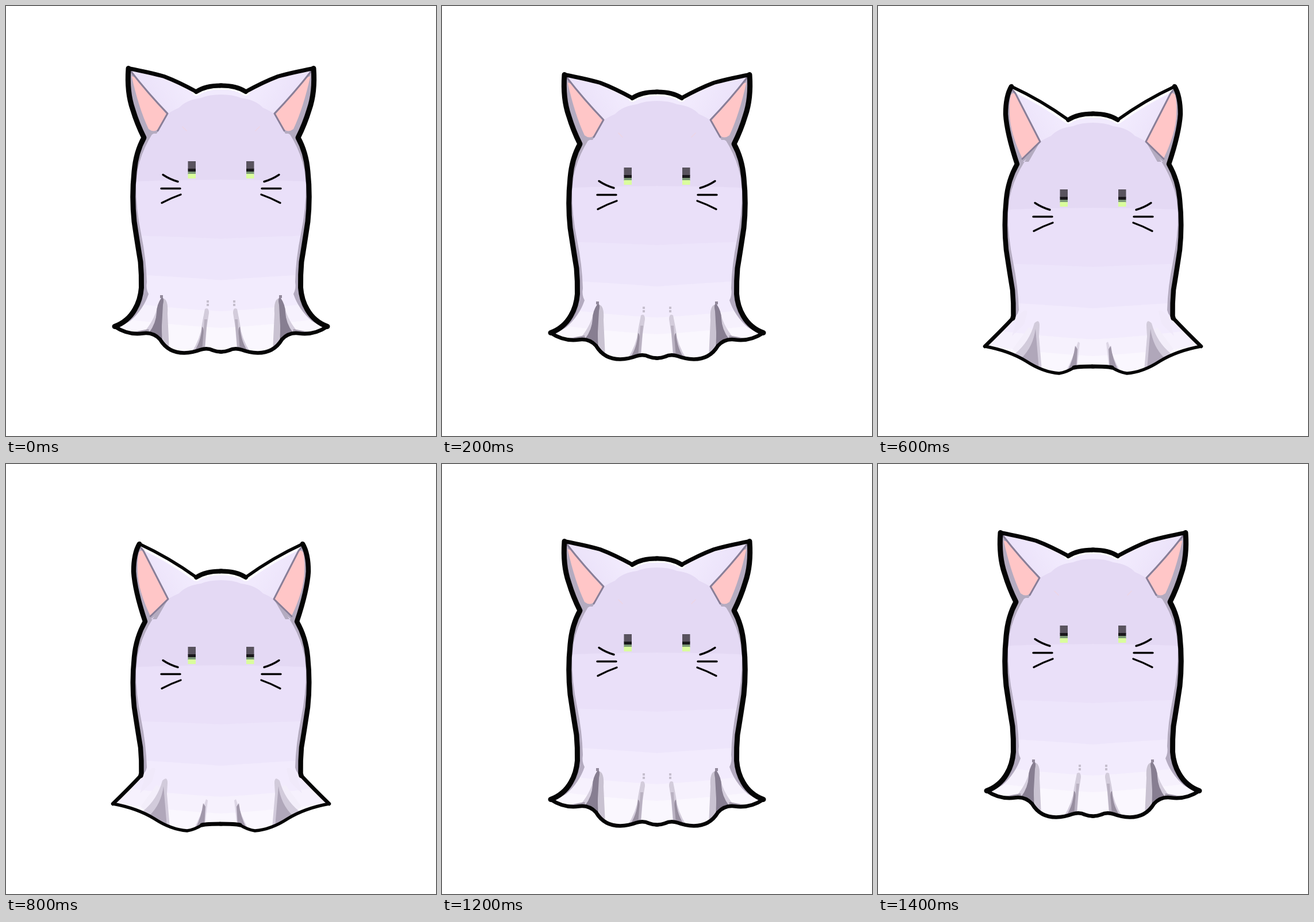
An HTML page with a canvas for the animation above (1.6 s loop, 748 by 748 pixels).

```html
<!DOCTYPE html>
<html lang="en">
<head>
<meta charset="utf-8">
<title>Ghost cat</title>
<style>
  html, body { margin: 0; width: 100%; height: 100%; overflow: hidden; background: #fff; }
  canvas { display: block; width: 100%; height: 100%; }
</style>
</head>
<body>
<canvas id="stage" width="748" height="748"></canvas>
<script>
const SIZE = 748, STEP = 200;
const ctx = document.getElementById('stage').getContext('2d');

// Vertical offset for every step of the bob; the low steps use the perky pose.
const DROP = [0, 11, 20, 49, 48, 42, 26, 11];
const isPerky = step => step >= 3 && step <= 5;

const HEAD = 'M375 138.500 Q348 138 331 149';
const FLANK = 'Q226 254 223 288 Q218.500 332 223 375 Q229 415 234 445 Q236 468 235.500 490';
const SHADE = 'M225 222 L262 222 L282 187 Q240 232 229 285 L226 312 Q226 352 235 396 Q244 440 245 480';

// Every drawing covers the left half and is mirrored for the right one.
const calm = {
  outline: [
    [8, HEAD],
    [7, 'M331 149 Q300 132 275 122.500 Q252 116 213 108.500'],
    [9, 'M213 108.500 Q210 150 220.500 180 Q228 205 240 229 ' + FLANK + ' Q234 511 224 528 Q212 549 189 557.500'],
    [6.5, 'M189 557.500 Q212 573 238 569.500 Q256 567 268 580 Q282 603.500 310 603.500 Q325 603 338 598 Q350 594 360 599 Q368 602 375 601.500']
  ],
  rim: HEAD,
  ear: 'M214 110 L281 187 L262 219 L243 230 L205 190 L207 110 Z',
  pink: 'M218.500 122 L224 124 L279 188 L265 214 Q257 221 248 214 Q231 178 218.500 122 Z',
  crease: 'M216 112 Q247 152 281 187 L264 217',
  shade: SHADE + ' Q243 492 248 501 Q239 528 216 548 L196 560 L190 550 L215 500 Z',
  marks: [
    ['#aaa2b4', 'M235 490 Q241 500 236 517 Q228 541 200 557 L196 550 L225 520 Z'],
    ['#d5cedd', 'M263 524 Q258 548 236 572 L262 574 L272 530 Z'],
    ['#c9c2d1', 'M270 508 Q283 507 281 535 L284 601 L273 588 L270 540 Z'],
    ['#877e91', 'M270 508 Q276 505 273 520 L271 556 L272 584 L249 568 Q261 552 262 533 Q262 520 270 508 Z'],
    ['#a49cac', 'M204 564 L216 568 L248 562 L251 575 L210 573 Z'],
    ['#d3ccdb', 'M346 527 Q353 523 353 534 L349 560 L346 601 L322 604 Q339 578 341 553 Z'],
    ['#b9b1c1', 'M345 545 L350 545 L345 599 L337 602 Q344 575 345 545 Z'],
    ['#978e9f', 'M341 558 Q345 559 343 574 L341 600 L325 604 Q339 586 341 558 Z'],
    ['#c6bfce', 'M349 512 h4 v4 h-4 Z M349 518 h4 v4 h-4 Z'],
    ['#948b9d', 'M268 503 h5 v5 h-5 Z']
  ]
};

const perky = {
  outline: [
    [8, HEAD],
    [5.5, 'M331 149 Q284 115 232 91'],
    [8.5, 'M232 91 Q222 108 222 139 Q224 172 242 226 ' + FLANK + ' L234.500 494'],
    [6.5, 'M234.500 494 Q213 517 186 543'],
    [5.5, 'M186 543 Q229 551 258 569 Q287 588 315 590 Q327 588.500 341 580'],
    [7, 'M341 580 Q349 578 375 578']
  ],
  rim: HEAD + ' Q284 115 236 93',
  ear: 'M231 88 L238 102 L283 187 L264 212 L244 229 L215 180 L218 110 Z',
  pink: 'M231 106 Q236 98 241 108 L281 186 L251 216 Q230 172 229 140 Q228 120 231 106 Z',
  crease: 'M235 98 L239 103 Q261 146 282 187 L251 217',
  shade: SHADE + ' L243 486 L237 494 L225 490 Z',
  marks: [
    ['#f0e9fa', 'M244 489 Q258 476 260 483 L254 505 L233 525 Z'],
    ['#f3eefa', 'M262 510 L234 548 L250 560 L276 520 Z'],
    ['#d2cbdb', 'M272 503 Q281 494 281 507 L280 526 L285 585 L238 556 Q263 536 272 503 Z'],
    ['#b0a7ba', 'M274 512 L280 583 L249 564 Q270 544 274 512 Z'],
    ['#ddd6e5', 'M348 535 L351 537 L346 581 L326 588 Q338 566 348 535 Z'],
    ['#a198aa', 'M343 542 L347 548 L345 581 L329 587 Q340 566 343 542 Z']
  ]
};

function prepare(pose) {
  const joined = pose.outline.map(([, d]) => d).join(' ');
  pose.body = new Path2D(joined.replace(/M/g, 'L').replace('L', 'M') + ' Z');
  for (const key of ['rim', 'ear', 'pink', 'crease', 'shade']) pose[key] = new Path2D(pose[key]);
  for (const key of ['outline', 'marks']) pose[key] = pose[key].map(([look, d]) => [look, new Path2D(d)]);
}
[calm, perky].forEach(prepare);

const fill = (color, path) => { ctx.fillStyle = color; ctx.fill(path); };
const line = (color, width, path) => {
  ctx.strokeStyle = color;
  ctx.lineWidth = width;
  ctx.stroke(path);
};
const box = (color, x, y, w, h) => { ctx.fillStyle = color; ctx.fillRect(x, y, w, h); };

const dome = new Path2D('M375 154 Q352 154 339 160 Q314 163 301 177 Q287 183 278 190 Q236 230 225 312 L375 312 Z');
const bands = [
  ['#eae0f9', 'M200 307 Q245 303 375 302 V410 H200 Z'],
  ['#ede5fb', 'M200 399 Q270 400 375 405 V480 H200 Z'],
  ['#f2ebfd', 'M200 466 Q270 469 375 477 V540 H200 Z'],
  ['#f6f1fd', 'M180 512 Q280 526 375 531 V610 H180 Z'],
  ['#faf7fe', 'M180 541 Q280 555 375 560 V610 H180 Z']
].map(([color, d]) => [color, new Path2D(d)]);
const whiskers = new Path2D('M273 293.500 Q285 301.500 299 305.500 M270 317.500 H303 M271 342.500 Q287 334 304 328');
const blush = new Path2D('M307 210 L314 217');

const earLight = ctx.createLinearGradient(230, 175, 300, 130);
earLight.addColorStop(0, '#e9dff8');
earLight.addColorStop(1, '#f1eafd');

function face(pose) {
  box('#59535e', 316.5, 270, 13.5, 14);
  box('#19171b', 316.5, 283, 13.5, 5);
  box('#7c9876', 316.5, 288, 13.5, 5);
  box('#dafd9d', 316.5, 292, 13.5, 8);
  line('#050505', 3.4, whiskers);
  if (pose === calm) line('#edd5e4', 1.5, blush);
}

function half(pose) {
  ctx.save();
  ctx.clip(pose.body);
  fill(earLight, pose.body);
  line('#fff', 14, pose.rim);
  fill('#e4d9f4', dome);
  bands.forEach(([color, path]) => fill(color, path));
  fill('#b4abc0', pose.shade);
  fill('#b4abc0', pose.ear);
  fill('#ffc6c7', pose.pink);
  line('#897f98', 3, pose.crease);
  pose.marks.forEach(([color, path]) => fill(color, path));
  ctx.restore();
  pose.outline.forEach(([width, path]) => line('#050505', width, path));
  face(pose);
}

function draw(now) {
  const step = Math.floor(now / STEP) % DROP.length;
  const pose = isPerky(step) ? perky : calm;
  ctx.setTransform(1, 0, 0, 1, 0, 0);
  box('#fff', 0, 0, SIZE, SIZE);
  ctx.lineCap = ctx.lineJoin = 'round';
  for (const side of [1, -1]) {
    ctx.setTransform(side, 0, 0, 1, side < 0 ? SIZE : 0, DROP[step]);
    half(pose);
  }
}

let start;
function tick(now) {
  start ??= now;
  draw(now - start);
  requestAnimationFrame(tick);
}
draw(0);
requestAnimationFrame(tick);
</script>
</body>
</html>
```
